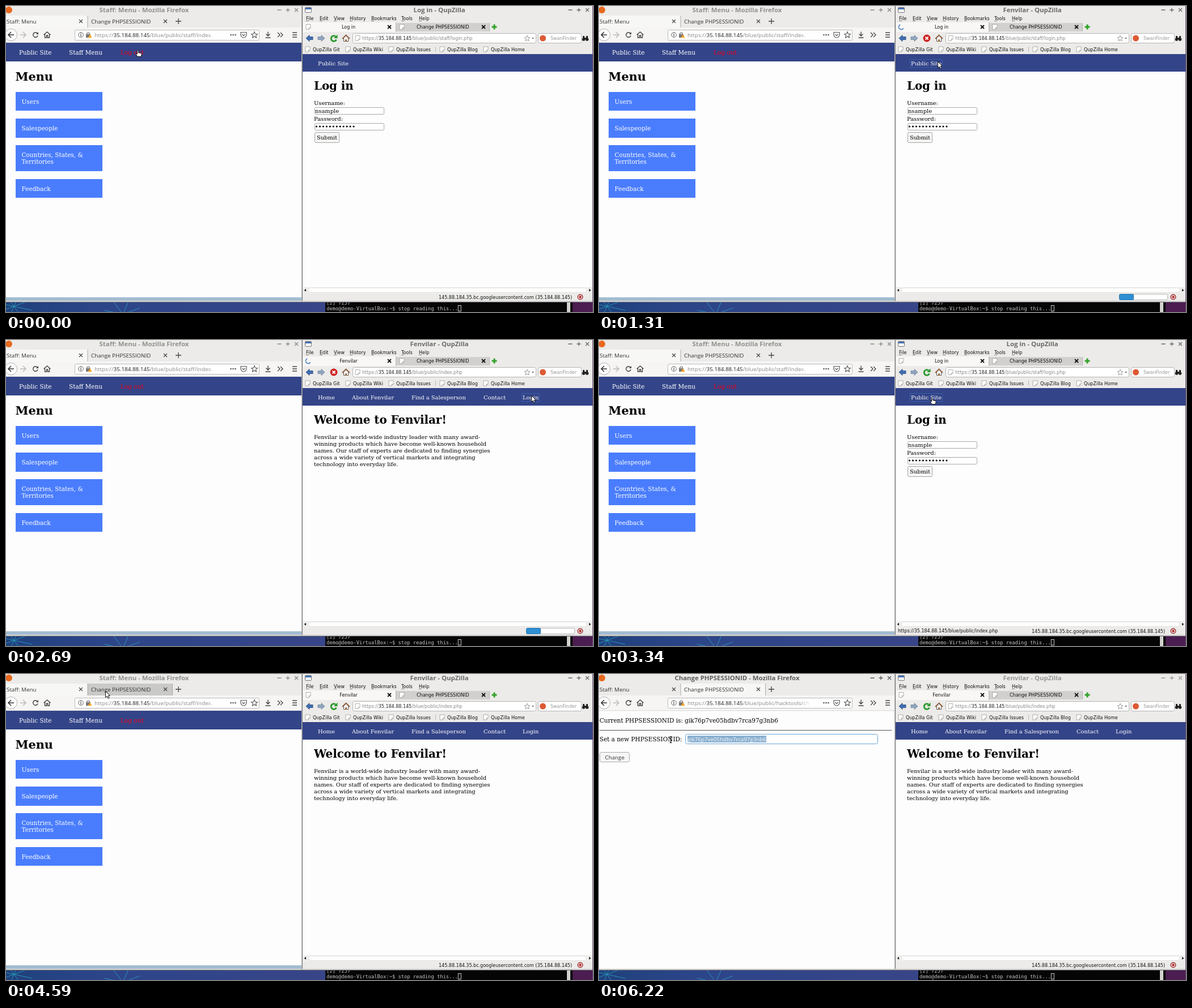
An HTML page with a canvas for the animation above (8000 ms loop, 1035 px wide and 541 px high).

```html
<!DOCTYPE html>
<html lang="en">
<head>
<meta charset="utf-8">
<title>Two browsers</title>
<style>
html, body { margin: 0; width: 100%; height: 100%; overflow: hidden; }
canvas { display: block; }
</style>
</head>
<body>
<canvas id="stage" width="1035" height="541"></canvas>
<script>
const ctx = document.getElementById('stage').getContext('2d');
const LOOP = 8000;
const SERIF = '"DejaVu Serif", serif', SANS = '"DejaVu Sans", sans-serif';
const UI = '"Open Sans", sans-serif', MONO = '"DejaVu Sans Mono", monospace';
const NAVY = '#334488', PAGE = '#fdfdfd', CHROME = '#ecebe9';
const HOST = '35.184.88.145', SITE = 'https://' + HOST + '/blue/public/';
const SESSION = 'gik76p7ve05hdbv7rca97g3nb6';

// [time, x, y, shape]: the pointer jumps from one stop to the next
const POINTER = [
  [0, 231, 78, 'hand'], [150, 285, 86, 'arrow'], [270, 420, 98, 'arrow'], [390, 560, 103, 'arrow'],
  [510, 598, 99, 'hand'], [660, 597, 98, 'hand'], [1310, 597, 98, 'arrow'], [1760, 640, 107, 'arrow'],
  [1910, 805, 162, 'arrow'], [2060, 922, 148, 'arrow'], [2180, 930, 137, 'arrow'], [2300, 926, 98, 'hand'],
  [2690, 926, 98, 'arrow'], [2960, 860, 104, 'arrow'], [3090, 700, 106, 'arrow'], [3220, 598, 103, 'hand'],
  [3340, 586, 102, 'hand'], [3480, 584, 100, 'arrow'], [3630, 519, 93, 'arrow'], [3780, 354, 82, 'arrow'],
  [3930, 218, 80, 'hand'], [4080, 130, 60, 'arrow'], [4200, 66, 42, 'arrow'], [4350, 125, 32, 'arrow'],
  [4470, 175, 30, 'arrow'], [5010, 215, 58, 'arrow'], [5130, 300, 96, 'arrow'], [5250, 340, 122, 'beam'],
  [5370, 336, 124, 'beam'], [5800, 250, 128, 'beam'], [5930, 160, 117, 'beam'], [6070, 126, 118, 'beam'],
  [6220, 126.5, 116, 'beam']
];

const during = (t, ...spans) => spans.some(([a, b]) => t >= a && t < b);

function rect(x, y, w, h, fill) {
  ctx.fillStyle = fill;
  ctx.fillRect(x, y, w, h);
}

function box(x, y, w, h, fill, stroke, r = 2) {
  ctx.beginPath();
  ctx.roundRect(x + .5, y + .5, w - 1, h - 1, r);
  ctx.fillStyle = fill;
  ctx.fill();
  ctx.strokeStyle = stroke;
  ctx.lineWidth = 1;
  ctx.stroke();
}

function disc(x, y, r, fill) {
  ctx.beginPath();
  ctx.arc(x, y, r, 0, 7);
  ctx.fillStyle = fill;
  ctx.fill();
}

function ring(x, y, r, color, width = 1, from = 0, to = 6.3) {
  ctx.beginPath();
  ctx.arc(x, y, r, from, to);
  ctx.strokeStyle = color;
  ctx.lineWidth = width;
  ctx.stroke();
}

// SVG path placed at x, y; filled, stroked or both
function shape(x, y, d, fill, stroke, width = 1) {
  const path = new Path2D(d);
  ctx.save();
  ctx.translate(x, y);
  if (fill) { ctx.fillStyle = fill; ctx.fill(path); }
  if (stroke) { ctx.strokeStyle = stroke; ctx.lineWidth = width; ctx.stroke(path); }
  ctx.restore();
}

// Returns the x where the text ends
function text(s, x, y, size, color, family = SERIF, weight = '', align = 'left') {
  ctx.font = `${weight} ${size}px ${family}`;
  ctx.textAlign = align;
  ctx.fillStyle = color;
  ctx.fillText(s, x, y);
  return x + ctx.measureText(s).width;
}

function address(path, x, y, size, family, strong) {
  x = text('https://', x, y, size, '#888', family);
  x = text(HOST, x, y, size, strong, family);
  text('/blue/public/' + path, x, y, size, '#888', family);
}

function controls(x, color) {
  shape(x, 7, 'M-3.5 0H3.5 M11.5 0H18.5 M15 -3.5V3.5 M27 -3L33 3 M33 -3L27 3', null, color, 1.3);
}

function frameBottom(x, w) {
  rect(x, 521, w, 2, '#d6d5d4');
  rect(x, 523, w, 1, '#6d6e75');
}

function desktop() {
  const sky = ctx.createLinearGradient(0, 0, 563, 0);
  sky.addColorStop(0, '#1f417c');
  sky.addColorStop(.3, '#2c4589');
  sky.addColorStop(1, '#384588');
  rect(0, 521, 563, 20, sky);
  for (const [x, y] of [[14, 531], [206, 545]]) {
    for (let i = 0; i < 8; i++) {
      const a = i * Math.PI / 4 + .3;
      shape(x, y, `M0 0L${34 * Math.cos(a)} ${24 * Math.sin(a)}`, null, '#2aa6c4', .8);
    }
  }
  rect(563, 521, 436, 20, '#050505');
  rect(989, 523, 6, 18, '#d4d2cf');
  rect(999, 521, 36, 20, '#4b1d50');
  text('[2] 7257', 565, 528, 8.75, '#bbb', MONO);
  const end = text('demo@demo-VirtualBox:~$ stop reading this...', 565, 537.5, 8.75, '#c4c4c4', MONO);
  ctx.strokeStyle = '#ccc';
  ctx.lineWidth = 1;
  ctx.strokeRect(end + .5, 529.5, 5, 10);
}

function staffPage() {
  rect(0, 65, 521, 33, NAVY);
  text('Public Site', 23, 86, 10.5, '#fff');
  text('Staff Menu', 111, 86, 10.5, '#fff');
  text('Log out', 202, 86, 10.5, '#f0001c');
  text('Menu', 16.5, 131.5, 20.8, '#000', SERIF, 'bold');
  const tiles = [[152, 33, 'Users'], [199, 34, 'Salespeople'],
    [246, 46, 'Countries, States, &', 'Territories'], [306, 33, 'Feedback']];
  for (const [y, h, ...lines] of tiles) {
    rect(17, y, 153, h, '#4a7dfd');
    lines.forEach((line, i) => text(line, 27.5, y + 20.5 + i * 12.5, 10.5, '#fff'));
  }
  rect(0, 515, 521, 6, '#a3bdd0');
}

function sessionPage(t) {
  text('Current PHPSESSIONID is: ' + SESSION, 1, 86, 10.45, '#000');
  rect(1, 99, 515, 1, '#555');
  text('Set a new PHPSESSIONID:', 1, 119, 10.45, '#000');
  box(152, 106, 340, 18, '#fff', t >= 5650 ? '#68a4d2' : '#aaa', 3);
  text(SESSION, 156, 119, 9.75, '#333', UI);
  if (t >= 5800) {
    const from = t < 5930 ? 250 : 156;
    rect(from, 109, 295 - from, 12, '#8bb0d0');
    ctx.save();
    ctx.beginPath();
    ctx.rect(from, 106, 150, 18);
    ctx.clip();
    text(SESSION, 156, 119, 9.75, '#f4f8fb', UI);
    ctx.restore();
  }
  box(1, 138, 53, 18, '#f6f6f6', '#aaa', 3);
  text('Change', 10.5, 150.5, 9.75, '#333', UI);
}

function leftWindow(t) {
  const session = t >= 4860, active = t >= 4720;
  rect(0, 0, 522, 522, PAGE);
  rect(0, 0, 522, 38, CHROME);
  disc(5, 7, 6, '#e8691f');
  text((session ? 'Change PHPSESSIONID' : 'Staff: Menu') + ' - Mozilla Firefox', 243.5, 10.5, 11.4,
    active ? '#5c5c5a' : '#90908e', UI, 'bold', 'center');
  controls(482, active ? '#555' : '#888');

  const hover = during(t, [4350, 4860]);
  rect(session ? 144 : 0, 17, session ? 149 : 144, 21, '#f7f7f6');
  if (hover) rect(144, 17, 149, 21, '#c9c9c8');
  rect(143.5, 17, 1, 21, '#a9a9a7');
  if (session || hover) rect(293, 17, 1, 21, '#a9a9a7');
  text('Staff: Menu', 1, 30.5, 9.8, '#333', UI);
  text('Change PHPSESSIONID', 150, 30.5, 9.8, '#333', UI);
  for (const x of [132, 281]) shape(x, 27, 'M-3 -3L3 3M3 -3L-3 3', null, '#444', 1.2);
  shape(304, 27, 'M-5 0H5M0 -5V5', null, '#444', 1.3);

  rect(0, 38, 522, 27, '#f6f5f4');
  ring(9, 51, 10.5, '#aaa');
  disc(9, 51, 10, '#fcfcfc');
  shape(9, 51, 'M5 0H-5M0 -5L-5 0L0 5', null, '#333', 1.5);
  shape(30, 51, 'M-5 0H5M0 -5L5 0L0 5', null, '#bbb', 1.5);
  ring(52, 51, 4.2, '#444', 1.5, .3, 5.5);
  shape(52, 51, 'M5 -5V-1H1Z', '#444');
  shape(72.5, 51, 'M-6 0L0 -5L6 0M-4 -1V5H-1V1H1V5H4V-1', null, '#444', 1.4);
  box(121, 42, 326, 19, '#fff', '#b9b9b7');
  ring(132, 51, 4.3, '#666');
  text('i', 132, 54, 8, '#555', UI, 'bold', 'center');
  shape(145, 51, 'M-4 -1H4V5H-4Z', '#777');
  ring(145, 50, 2.6, '#777', 1.3, Math.PI, 0);
  shape(148, 52, 'M0 -2L3.5 4H-3.5Z', '#f0a020');
  ctx.save();
  ctx.beginPath();
  ctx.rect(122, 43, 248, 17);
  ctx.clip();
  address(session ? 'hacktools/change' : 'staff/index.', 156, 55, 9.85, UI, '#222');
  const fade = ctx.createLinearGradient(354, 0, 371, 0);
  fade.addColorStop(0, 'rgba(255,255,255,0)');
  fade.addColorStop(1, 'rgba(255,255,255,.8)');
  rect(354, 43, 17, 17, fade);
  ctx.restore();
  for (const x of [396.5, 400.5, 404.5]) disc(x, 51, 1.3, '#555');
  shape(419, 51, 'M-5 -4.5H5V0C5 3 2 5 0 5S-5 3 -5 0ZM-2.5 -1L0 1.5L2.5 -1', null, '#555', 1.2);
  shape(438, 51, 'M0 -5.5L1.6 -1.8L5.5 -1.5L2.5 1.2L3.5 5L0 3L-3.5 5L-2.5 1.2L-5.5 -1.5L-1.6 -1.8Z', null, '#555', 1.1);
  shape(462, 51, 'M0 -5.5V2M-3.5 -1.5L0 2L3.5 -1.5M-4.5 5H4.5', null, '#444', 1.4);
  shape(483, 51, 'M-4 -4L0 0L-4 4M1 -4L5 0L1 4', null, '#444', 1.3);
  shape(509, 51, 'M-4 -4H4M-4 0H4M-4 4H4', null, '#444', 1.4);
  rect(0, 64.5, 522, .7, '#c9c9c7');

  session ? sessionPage(t) : staffPage();
  frameBottom(0, 522);
}

const pageIcon = (x, y) => shape(x, y, 'M-4 -4.5H4V1.5L1 4.5H-4ZM4 1.5H1V4.5', '#fff', '#a5a5a3', .9);

function loginPage() {
  text('Public Site', 550, 105, 9.9, '#fff');
  text('Log in', 543, 148, 19.8, '#000', SERIF, 'bold');
  text('Username:', 543, 175, 9.9, '#000');
  text('Password:', 543, 203, 9.9, '#000');
  box(544, 179, 123, 13, '#fff', '#a9a9a9');
  box(544, 207, 123, 13, '#fff', '#a9a9a9');
  text('nsample', 545, 189, 9.9, '#000');
  for (let i = 0; i < 12; i++) disc(547.5 + i * 5.95, 213, 1.6, '#000');
  box(544, 223, 44, 19, '#f5f5f4', '#a5a5a5');
  text('Submit', 548, 236, 9.9, '#000');
}

function homePage() {
  const links = { 'Home': 550, 'About Fenvilar': 610, 'Find a Salesperson': 715, 'Contact': 842, 'Login': 911 };
  for (const name in links) text(name, links[name], 105, 9.9, '#fff');
  text('Welcome to Fenvilar!', 543, 148, 19.8, '#000', SERIF, 'bold');
  ['Fenvilar is a world-wide industry leader with many award-',
    'winning products which have become well-known household',
    'names. Our staff of experts are dedicated to finding synergies',
    'across a wide variety of vertical markets and integrating',
    'technology into everyday life.'
  ].forEach((line, i) => text(line, 543, 175 + i * 12, 9.9, '#000'));
}

function rightWindow(t) {
  const home = during(t, [1460, 2960], [3780, LOOP]);
  const named = during(t, [1310, 2840], [3480, LOOP]);
  const spinning = during(t, [1310, 1460], [2690, 2960], [3480, 3780]);
  const loading = spinning || during(t, [1150, 1310]);
  const active = t < 4720;

  rect(522, 0, 513, 523, CHROME);
  box(527, 2, 12, 10, '#f4f4f4', '#777', 1);
  rect(528, 3, 10, 3, '#4673b5');
  text((named ? 'Fenvilar' : 'Log in') + ' - QupZilla', 764, 10.5, 11.4,
    active ? '#6a6a68' : '#989896', UI, 'bold', 'center');
  controls(995, active ? '#666' : '#999');

  const menu = { File: 529, Edit: 553, View: 578, History: 606, Bookmarks: 644, Tools: 697, Help: 728 };
  for (const name in menu) {
    text(name, menu[name], 24.5, 8, '#111', SANS);
    rect(menu[name], 26, 5, .7, '#555');
  }

  rect(524, 29, 163, 17, '#f8f7f6');
  rect(688, 30, 164, 15, '#d1d0ce');
  rect(687, 29, 1, 17, '#b5b4b2');
  rect(852, 30, 1, 15, '#b5b4b2');
  if (spinning) ring(533, 37, 4.5, '#3f78c0', 1.5, .6, 4.3);
  else pageIcon(533, 37);
  pageIcon(698, 37);
  text(home ? 'Fenvilar' : 'Log in', 604, 40, 8, '#111', SANS, '', 'center');
  text('Change PHPSESSIONID', 724, 40, 8, '#111', SANS);
  for (const x of [676, 842]) shape(x, 37, 'M-3 -3L3 3M3 -3L-3 3', null, '#111', 1.8);
  shape(861, 37, 'M-4.5 0H4.5M0 -4.5V4.5', null, '#35a32a', 3);

  const arrow = 'M-6 0L0 -5.5V-2.5H6V2.5H0V5.5Z';
  shape(535, 57, arrow, '#3f6fb4', '#26457a', .8);
  shape(556, 57, 'M6 0L0 -5.5V-2.5H-6V2.5H0V5.5Z', '#8fa5c0', '#71839b', .8);
  if (loading) {
    disc(578, 57, 6.5, '#cf2222');
    shape(578, 57, 'M-2.5 -2.5L2.5 2.5M2.5 -2.5L-2.5 2.5', null, '#fff', 1.8);
  } else {
    ring(578, 57.5, 4.8, '#2f9a2f', 3, .4, 5.4);
    shape(578, 57, 'M6.5 -6.5V0H0Z', '#2f9a2f');
  }
  shape(599.5, 57, 'M-4 0V5.5H4V0', '#fff', '#555');
  shape(599.5, 57, 'M-6.5 1L0 -5.5L6.5 1', null, '#8a5a3c', 1.8);
  rect(598, 59, 3, 4, '#9a6b40');

  box(611, 48, 324, 18, '#fff', '#b5b4b2', 3);
  pageIcon(620, 57);
  address(home ? 'index.php' : 'staff/login.php', 628, 60, 8, SANS, '#222');
  shape(919, 57, 'M0 -5L1.5 -1.5L5 -1.2L2.3 1L3.2 4.8L0 2.8L-3.2 4.8L-2.3 1L-5 -1.2L-1.5 -1.5Z', null, '#999', 1);
  for (const x of [929, 956]) shape(x, 57, 'M-2 -1H2L0 1.5Z', '#666');
  box(938, 48, 77, 18, '#fff', '#b5b4b2', 3);
  disc(946.5, 57, 5.5, '#dd5a35');
  text('SwanFinder', 960, 60, 8, '#999', SANS);
  disc(1018.5, 59, 2.8, '#222');
  disc(1024.5, 59, 2.8, '#222');
  rect(1017, 53, 3, 5, '#222');
  rect(1023, 53, 3, 5, '#222');
  rect(1020, 56, 3, 3, '#222');

  const marks = { Git: 541, Wiki: 612, Issues: 688, Blog: 778, Home: 855 };
  for (const name in marks) {
    pageIcon(marks[name] - 9, 76.5);
    text('QupZilla ' + name, marks[name], 80, 8, '#111', SANS);
  }
  rect(757, 72, 1, 9, '#b9b8b6');

  rect(523, 85, 511, 412, PAGE);
  rect(523, 85, 511, 31, NAVY);
  home ? homePage() : loginPage();
  const focus = during(t, [1030, 1460], [3340, 3780]) ? [548, 58] : during(t, [2540, 2960]) && [909, 32];
  if (focus) {
    ctx.setLineDash([1, 1]);
    ctx.strokeStyle = '#3f7cc8';
    ctx.lineWidth = 1;
    ctx.strokeRect(focus[0] + .5, 94.5, focus[1] - 1, 14);
    ctx.setLineDash([]);
  }

  rect(523, 497, 511, 11, '#efeeec');
  box(533, 498, 491, 9, '#fdfdfd', '#e2e1df', 3);
  shape(527, 502.5, 'M2 -2.5V2.5L-1.5 0Z', '#222');
  shape(1030, 502.5, 'M-2 -2.5V2.5L1.5 0Z', '#222');
  const link = during(t, [510, 1310], [3220, 3480]) ? 'index.php' : during(t, [2300, 2690]) && 'staff/login.php';
  if (link) text(SITE + link, 527, 517, 8, '#111', SANS);
  if (loading) {
    box(917, 509, 86, 11, '#fff', '#bbb');
    box(917, 509, 26, 11, '#2f8fd4', '#2473ae');
  } else {
    text('145.88.184.35.bc.googleusercontent.com (35.184.88.145)', 763, 517.5, 8, '#111', SANS);
  }
  ring(1012.5, 514.5, 4.3, '#a02a2a', 1.4);
  disc(1012.5, 514.5, 2.2, '#b52a2a');
  rect(521.5, 0, 1.5, 523, '#77777a');
  frameBottom(522, 513);
  rect(1034, 0, 1, 541, '#6b4a72');
}

function pointer(t) {
  const [, x, y, kind] = POINTER.findLast(stop => t >= stop[0]);
  if (kind === 'arrow') {
    shape(x, y, 'M.5 .5V11.5L3.2 9L5 13L7 12.2L5.2 8.2H8.5Z', '#fff', '#111');
  } else if (kind === 'hand') {
    shape(x, y, 'M.5 1Q1.5 -.5 2.5 1V4.5L7.5 5.5Q8.5 6 8 8L7 11.5H1L-2 7Q-2 5.5 .5 7Z', '#fff', '#111');
  } else {
    shape(x, y, 'M-2 -5.5H-.8L0 -4.8L.8 -5.5H2M0 -5V5M-2 5.5H-.8L0 4.8L.8 5.5H2', null, '#111', 1.2);
  }
}

function draw(now) {
  const t = now % LOOP;
  desktop();
  leftWindow(t);
  rightWindow(t);
  pointer(t);
  requestAnimationFrame(draw);
}
requestAnimationFrame(draw);
</script>
</body>
</html>
```
